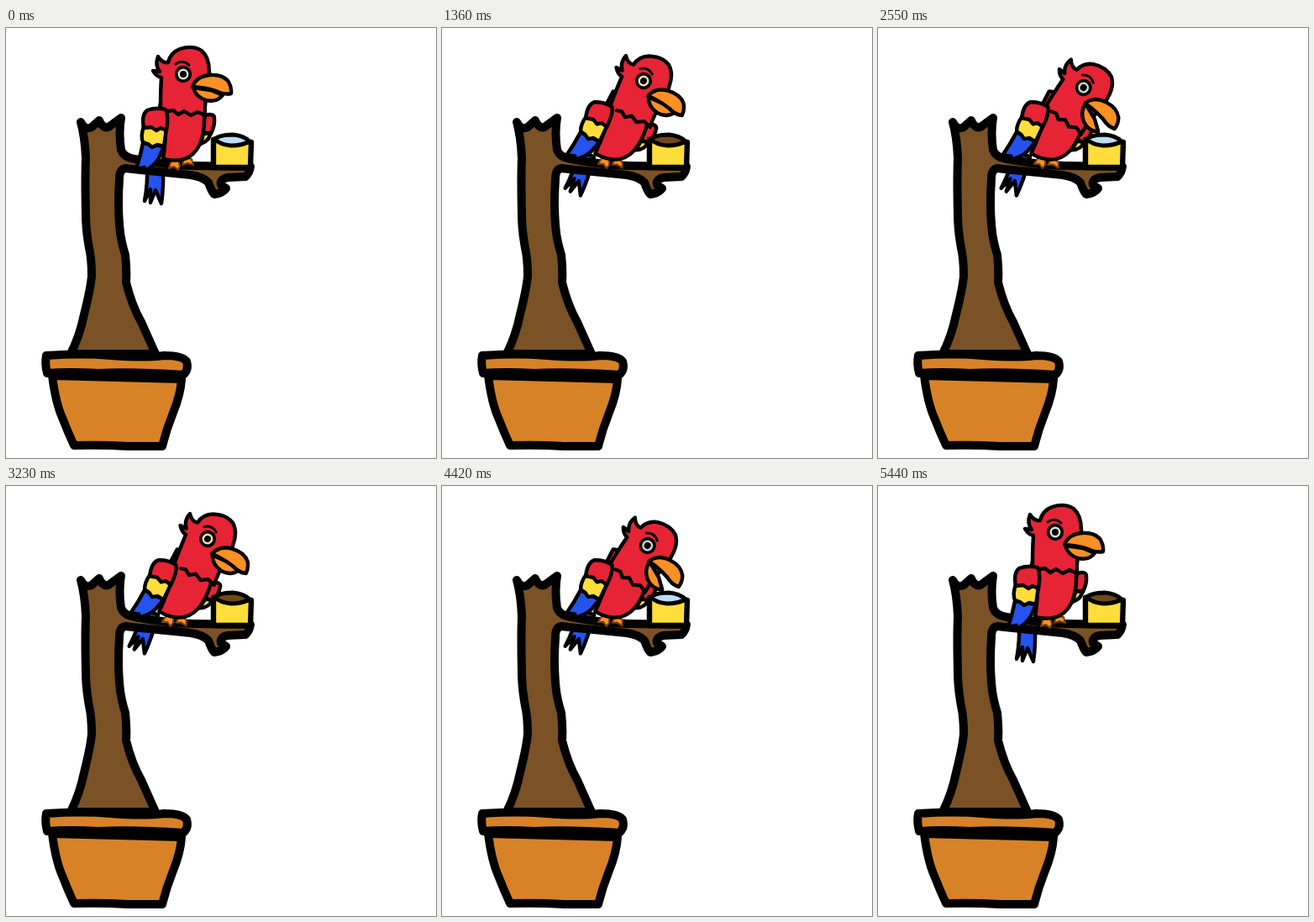
These frames come from a looping animation (512x512 px, 5.61 s). An HTML page:

```html
<!DOCTYPE html>
<html lang="en">
<head>
<meta charset="utf-8">
<title>Drinking parrot</title>
<style>
html, body { margin: 0; width: 100%; height: 100%; overflow: hidden; background: #fff; }
svg { display: block; width: 100%; height: 100%; }
.red { fill: #e62435; }
.yellow { fill: #ffde3b; }
.blue { fill: #2453ee; }
.orange { fill: #f99023; }
.brown { fill: #7a5225; }
.pot { fill: #d88227; }
.line { fill: none; }
</style>
</head>
<body>
<svg viewBox="0 0 512 512" stroke="#000" stroke-width="4.4" stroke-linejoin="round" stroke-linecap="round">
  <g class="body">
    <path class="blue" d="M168 160 Q169 185 165 206 L172 192 L172 208 L178 193 L185 209 Q188 190 187 160 Z"/>
  </g>

  <g stroke-width="10">
    <path class="brown" d="M77 388 Q88 366 93 341 Q101 309 102 295 Q102 275 99 262 Q95 240 95 222 Q94 180 95 155
      Q94 130 89 112 Q94 122 102 118 L111 110 Q115 120 122 118 L137 107 Q134 125 137 145
      Q140 154 153 156 Q190 163 222 164 L291 165 Q290 173 285 177 L264 178 Q254 180 256 187 L262 191
      Q257 197 248 198 Q245 195 241 184 Q234 177 220 175 Q190 172 160 169 L142 167
      Q135 168 135 180 Q133 210 135 234 Q136 251 142 270 Q144 289 143 303 Q150 331 161 350 L178 388 Z"/>
    <path class="pot" d="M55 414 Q59 446 67 464 Q74 482 81 497 Q115 496 145 498 L186 498 Q191 478 199 458 Q208 436 209 418 Z"/>
    <path class="pot" d="M48 390 Q90 387 125 390 Q165 393 188 390 Q210 390 215 397 Q218 407 211 413 Q150 409 110 411 Q75 409 49 411 Q46 400 48 390 Z"/>
    <path class="line" d="M69 415 Q130 417 206 416" stroke-width="7"/>
  </g>

  <g class="body">
    <path class="red" d="M237 104 Q248 101 248 107 Q249 116 244 126 L233 124 Z"/>
    <path class="yellow" d="M235 126 L243 125 Q243 134 232 138 Z"/>
    <g stroke-width="2" stroke="#7a3d0a">
      <path class="orange" d="M197 157 L194 167 L200 165 L205 169 L207 164 L205 157 Z"/>
      <path class="orange" d="M212 154 L210 163 L216 161 L223 163 L221 156 Z"/>
    </g>
    <path class="red" d="M192 78 L186 79 L182 100 L190 104 L190 125 Q189 145 187 156 Q205 160 217 154 Q229 147 233 132 Q237 118 236 102"/>
  </g>

  <g id="head">
    <path class="red" d="M184 95 Q184 75 185 59 Q179 58 175 51 L183 52 Q177 44 181 34 Q186 42 193 41
      Q196 29 207 25 Q222 20 233 27 Q242 35 242 52 L243 62 Q236 83 237 104
      L228 100 L220 104 L212 99 L205 103 L199 98 L193 99"/>
    <path class="line" d="M202 43 Q210 37 218 44" stroke-width="3"/>
    <circle id="eye" cx="211" cy="55" r="8.3" stroke-width="3.7"/>
    <circle cx="211" cy="55" r="4" stroke="none"/>
    <path id="jaw" class="orange" d="M223 71 Q226 82 238 86 Q251 89 258 80 L244 74 Z"/>
    <path class="orange" d="M222 70 Q227 57 243 56 Q258 55 265 64 Q269 71 268 78 Q260 80 250 75 Q238 71 222 70 Z"/>
  </g>

  <g class="body">
    <path class="blue" d="M163 137 Q160 153 155 168 L165 166 L164 171 Q176 165 182 155 L188 141 Z"/>
    <path class="yellow" d="M164 117 Q160 129 163 136 L169 138 L174 142 L180 139 L188 141 L191 120 Z"/>
    <path class="red" d="M164 119 Q161 103 168 98 Q179 94 190 97 Q194 105 191 122 L184 119 L179 122 L173 118 Z"/>
  </g>

  <path class="yellow" d="M247 133 L247 166 L291 166 L292 136 Z" stroke-width="6.4"/>
  <path id="drink" d="M248 132 Q256 127 270 127 Q283 128 290 135 Q281 140 268 140 Q255 139 248 132 Z" stroke-width="5"/>
</svg>
<script>
const STEP = 170;
const get = id => document.getElementById(id);
const bodies = document.querySelectorAll('.body');

// body tilt, eye x, eye y, head tilt, jaw opening
const poses = [
  [0, 211, 55, 0, 0],
  [7, 227, 58, 7, 0],
  [17, 240, 63, 20, -4],
  [17, 242, 67, 25, 6],
  [17, 244.7, 71, 31, 20],
  [17, 246, 72, 32, 14]
];
const eyes = ['#dde5e5', '#cbd8f2', '#f5e2ad', '#dbe0d5', '#cbdbe0', '#d5dcdd'];

function draw(now) {
  const beat = Math.floor(now / STEP) % 11;
  const i = Math.min(beat, 10 - beat); // lean in, then back the same way
  const [tilt, x, y, turn, open] = poses[i];
  for (const b of bodies) b.setAttribute('transform', `rotate(${tilt} 207 137)`);
  get('head').setAttribute('transform', `translate(${x} ${y}) rotate(${turn}) translate(-211 -55)`);
  get('jaw').setAttribute('transform', `rotate(${open} 225 71)`);
  get('eye').setAttribute('fill', eyes[i]);
  get('drink').setAttribute('fill', beat < 6 ? '#bfdcf5' : '#70491a');
}

const start = performance.now();
function tick() {
  draw(performance.now() - start);
  requestAnimationFrame(tick);
}
tick();
</script>
</body>
</html>
```
